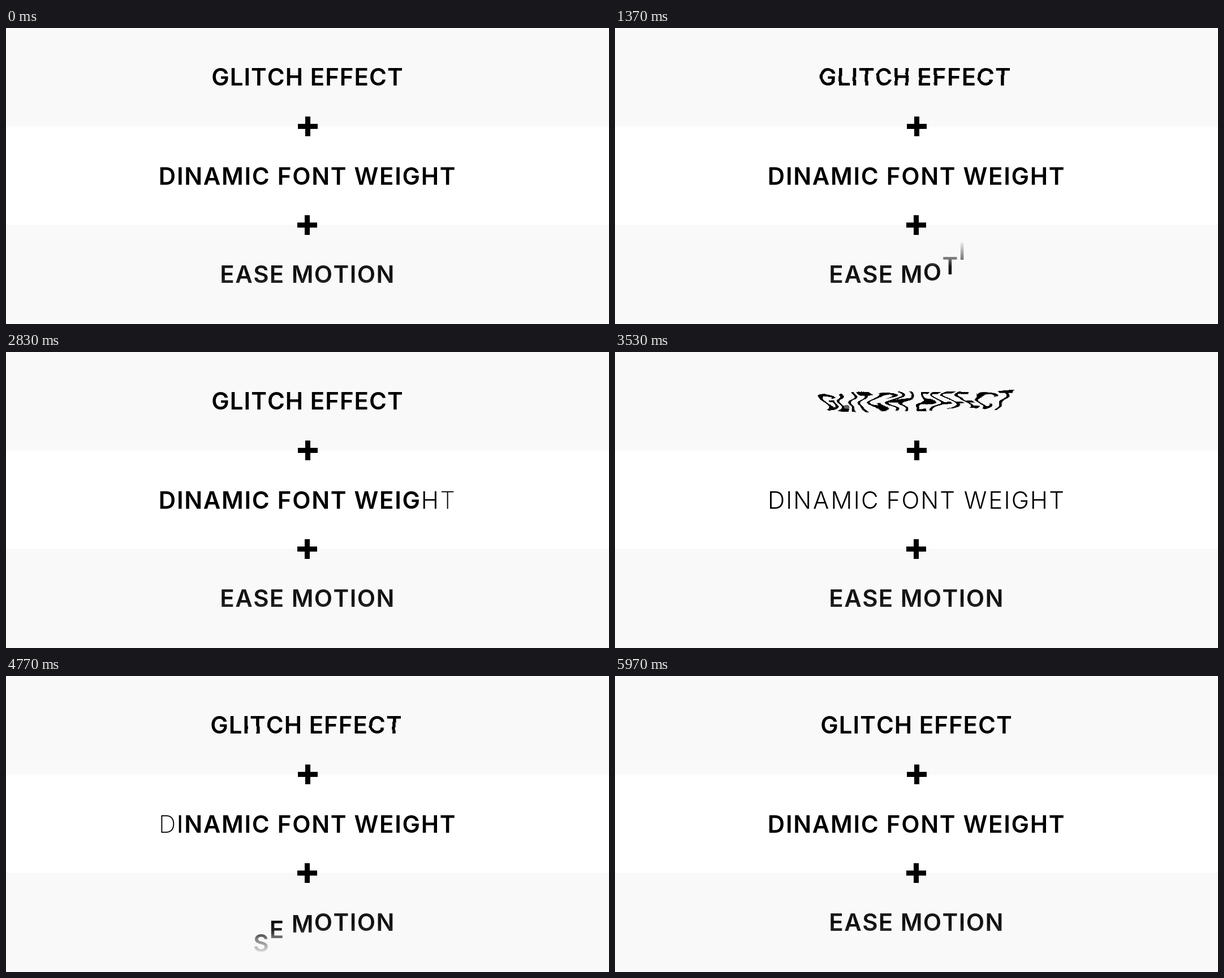
An HTML page that plays this animation: 1066x525 px, repeating every 6010 ms.

```html
<!DOCTYPE html>
<html lang="en">
<head>
<meta charset="utf-8">
<title>Type effects</title>
<style>
  html, body { margin: 0; width: 100%; height: 100%; overflow: hidden; background: #fff; }
  .stage { position: relative; width: 1066px; height: 525px; overflow: hidden; }
  .band { position: absolute; left: 0; width: 100%; height: 175px; background: #f9f9f9; }
  .row {
    position: absolute; left: 0; width: 100%; height: 120px; margin: 0;
    font: 600 42px/120px Inter, sans-serif; font-optical-sizing: none;
    color: #000; text-align: center; white-space: pre;
  }
  .row span { display: inline-block; }
  #glitch { top: 27px; letter-spacing: 1px; }
  #weight { top: 202.5px; letter-spacing: 1.7px; }
  #ease {
    top: 377px; letter-spacing: 1.4px;
    --fade: linear-gradient(transparent, rgba(0,0,0,.5) 26%, rgba(0,0,0,.9) 38%,
      rgba(0,0,0,.95) 50%, rgba(0,0,0,.86) 62%, rgba(0,0,0,.5) 74%, transparent);
    -webkit-mask-image: var(--fade); mask-image: var(--fade);
  }
  .plus { position: absolute; width: 35px; height: 35px; }
  .plus::before, .plus::after { content: ""; position: absolute; background: #000; }
  .plus::before { left: 0; top: 13px; width: 35px; height: 9px; }
  .plus::after { left: 13px; top: 0; width: 9px; height: 35px; }
  svg { position: absolute; width: 0; height: 0; }
</style>
</head>
<body>
<svg aria-hidden="true">
  <filter id="warp" x="0" y="0" width="100%" height="100%" color-interpolation-filters="sRGB">
    <feTurbulence id="noise" type="fractalNoise" baseFrequency="0.012 0.07" numOctaves="1"/>
    <!-- opaque noise, with the vertical push damped -->
    <feColorMatrix values="1 0 0 0 0  0 .3 0 0 .35  0 0 1 0 0  0 0 0 0 1" result="n"/>
    <feDisplacementMap id="shift" in="SourceGraphic" in2="n" xChannelSelector="R" yChannelSelector="G"/>
  </filter>
</svg>
<div class="stage">
  <div class="band" style="top:0"></div>
  <div class="band" style="top:349px;height:176px"></div>
  <h1 class="row" id="glitch">GLITCH EFFECT</h1>
  <div class="plus" style="left:516px;top:157px"></div>
  <h1 class="row" id="weight">DINAMIC FONT WEIGHT</h1>
  <div class="plus" style="left:515px;top:332px"></div>
  <h1 class="row" id="ease">EASE MOTION</h1>
</div>
<script>
const LOOP = 6010;
const $ = id => document.getElementById(id);
const clamp = x => Math.min(1, Math.max(0, x));

// Wraps each letter and freezes its cell, so a weight change moves no neighbour.
function split(row) {
  const text = row.textContent;
  row.setAttribute('aria-label', text);
  row.textContent = '';
  const spans = [...text].map(ch => {
    const el = document.createElement('span');
    el.textContent = ch;
    row.append(el);
    return el;
  });
  const boxes = spans.map(el => el.getBoundingClientRect());
  spans.forEach((el, i) => { el.style.width = boxes[i].width + 'px'; });
  return spans.map((el, i) => ({ el, x: boxes[i].left + boxes[i].width / 2 }))
    .filter(({ el }) => el.textContent !== ' ');
}

split($('glitch'));
const weightLetters = split($('weight'));
const easeLetters = split($('ease'));

// Two runs of jitter: each opens with a kick, then trembles in four swells.
const RUN = 2540;

function drawGlitch(t) {
  const u = t < 3430 ? t : t - 3430;
  const on = u < RUN;
  const kick = u / 100 * Math.exp(1 - u / 100);
  const swell = Math.abs(Math.sin(4 * Math.PI * u / RUN));
  const dx = on ? -6 * Math.sin(4 * Math.PI * u / RUN) : 0;
  const row = $('glitch');
  row.style.transform = `translate(${dx}px, ${dx / 6}px)`;
  row.style.filter = on && u > 0 ? 'url(#warp)' : 'none';
  $('shift').setAttribute('scale', 60 * kick + 9 * swell);
  $('noise').setAttribute('seed', Math.floor(t / 70));
}

const blink = (t, from, to) => Math.sqrt(Math.sin(Math.PI * clamp((t - from) / (to - from))));
const wave = (t, x, at, centre) =>
  Math.exp(-Math.pow((x - centre - (t - at) * 0.49) / 46, 4));

function drawWeight(t) {
  const all = Math.max(blink(t, 30, 1270) || 0, blink(t, 3430, 4080) || 0);
  for (const { el, x } of weightLetters) {
    const thin = Math.max(all, wave(t, x, 2200, 476), wave(t, x, 5330, 541));
    el.style.fontWeight = Math.round(600 - 400 * thin);
  }
}

// Letters fall out below, then drop in from above, one after another.
function fall(t, i) {
  const clock = t > 4000 ? (t - 4560) / 0.42 : t - 30;
  const u = clock - 80 * i;
  if (u < 440) return 100 * Math.pow(clamp(u / 440), 4);
  return -100 * Math.pow(1 - clamp((u - 693) / 440), 4);
}

function drawEase(t) {
  easeLetters.forEach(({ el }, i) => {
    el.style.transform = `translateY(${fall(t, i)}px)`;
  });
}

function frame() {
  const t = performance.now() % LOOP;
  drawGlitch(t);
  drawWeight(t);
  drawEase(t);
  requestAnimationFrame(frame);
}
frame();
</script>
</body>
</html>
```
